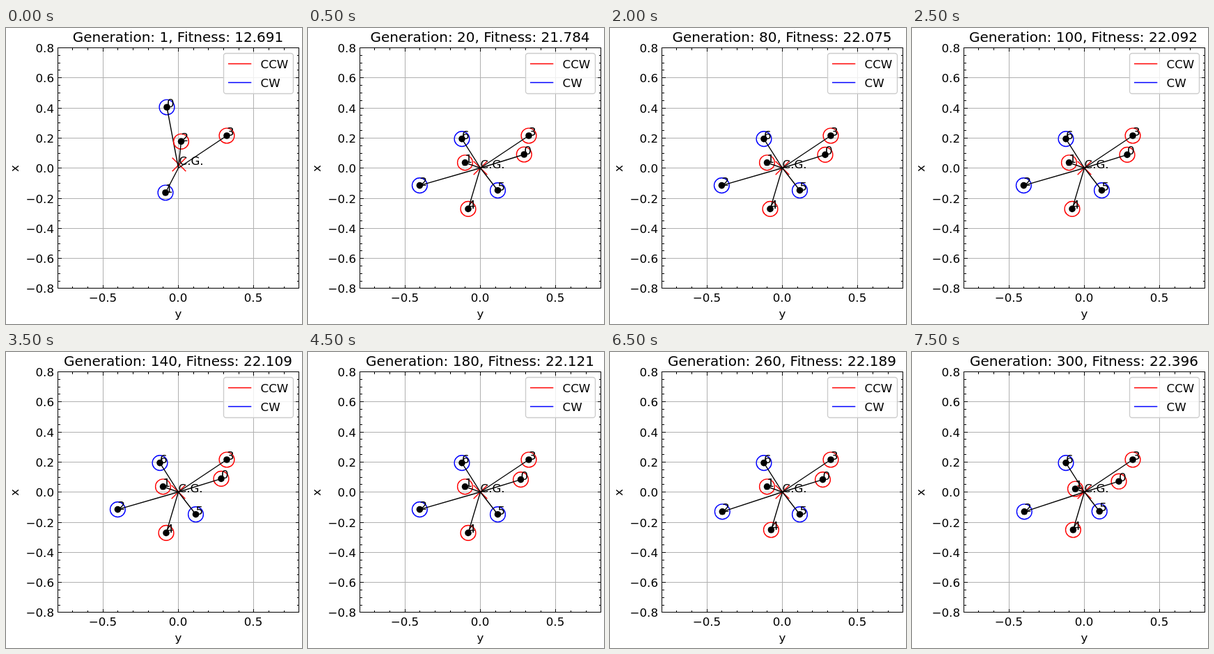
An HTML page that plays this animation: 425x426 px, repeating every 8000 ms.

```html
<!DOCTYPE html>
<html>
<head>
<meta charset="utf-8">
<style>
html, body { margin: 0; width: 100%; height: 100%; overflow: hidden; background: #fff; }
svg { display: block; font: 16.67px "DejaVu Sans", sans-serif; }
.mid { text-anchor: middle; }
.end { text-anchor: end; }
.crisp { shape-rendering: crispEdges; stroke-width: 1; fill: none; }
.line { stroke-width: 1.39; fill: none; }
</style>
</head>
<body>
<svg id="stage" width="425" height="426" viewBox="0 0 425 426"></svg>
<script>
const stage = document.getElementById('stage');
const RED = '#f00', BLUE = '#00f', STEP = 500;
const OX = 247.5, OY = 201.5, UNIT = 216.6;

const snap = v => Math.floor(v) + 0.5;
const px = v => snap(OX + v * UNIT);
const py = v => snap(OY + 0.2 - v * UNIT);
const path = (d, color, cls = 'line') => `<path class="${cls}" d="${d}" stroke="${color}"/>`;
const text = (x, y, s, attrs = '') => `<text x="${x}" y="${y}" ${attrs}>${s}</text>`;
const label = v => v.toFixed(1).replace('-', '\u2212');

function axes() {
  const L = px(-0.8), R = px(0.8), T = py(0.8), B = py(-0.8);
  let grid = '', ticks = '', labels = '';
  for (let i = -16; i <= 16; i++) {
    const y = py(i / 20), major = i % 4 === 0, len = major ? 5 : 3;
    ticks += `M${L} ${y}h${len}M${R} ${y}h${-len}`;
    if (major) {
      grid += `M${L} ${y}H${R}`;
      labels += text(69, y + 6, label(i / 20), 'class="end"');
    }
  }
  for (let i = -8; i <= 8; i++) {
    const x = px(i / 10), major = i % 5 === 0, len = major ? 5 : 3;
    ticks += `M${x} ${B}v${-len}M${x} ${T}v${len}`;
    if (major) {
      grid += `M${x} ${T}V${B}`;
      labels += text(x - 0.5, 394, label(i / 10), 'class="mid"');
    }
  }
  const frame = `M${L} ${T}H${R}V${B}H${L}Z`;
  return {
    back: path(grid, '#b0b0b0', 'crisp'),
    front: path(ticks + frame, '#000', 'crisp') + labels +
      text(247.5, 417, 'y', 'class="mid"') +
      text(0, 0, 'x', 'class="mid" transform="translate(18 202) rotate(-90)"')
  };
}

function legend() {
  const row = (y, color, name) => path(`M319 ${y}h33.3`, color) + text(365.5, y + 6, name);
  return '<rect x="312.5" y="36.5" width="100" height="58" rx="3.5" fill="#fff" fill-opacity=".8" stroke="#ccc" stroke-width="1.39"/>' +
    row(51.5, RED, 'CCW') + row(78.5, BLUE, 'CW');
}

const fitness = ['12.691', '21.784', '21.969', '22.036', '22.075', '22.092', '22.104', '22.109',
  '22.118', '22.121', '22.146', '22.150', '22.178', '22.189', '22.280', '22.396'];

// Each node is [x, y, colour], listed by its index.
function nodesAt(i) {
  if (i === 0) return [[231, 114, BLUE], [229, 237, BLUE], [251.5, 163.3, RED], [317, 155, RED]];
  const first = i < 4 ? [310.3, 182] : i < 8 ? [309, 182.4] : i < 15 ? [305.5, 183.6] : [297, 186.2];
  return [
    [...first, RED],
    i < 15 ? [225.5, 193.8, RED] : [234.5, 197, RED],
    i < 12 ? [160.4, 226.6, BLUE] : [161.3, 229.8, BLUE],
    [317, 155, RED],
    i < 12 ? [230, 260.4, RED] : [231.4, 256, RED],
    i < 14 ? [272.5, 233.7, BLUE] : [269.2, 229.3, BLUE],
    [221, 159.6, BLUE]
  ];
}

function plot(i) {
  const [cx, cy] = i ? [OX, OY] : [248.5, 196.5];
  let shapes = path(`M${cx - 9.8} ${cy - 9.8}l19.6 19.6m0 -19.6l-19.6 19.6`, RED);
  let names = text(cx, cy, 'C.G.');
  nodesAt(i).forEach(([x, y, color], n) => {
    shapes += `<circle class="line" cx="${x}" cy="${y}" r="10.9" stroke="${color}"/>` +
      `<circle cx="${x}" cy="${y}" r="4.8"/>` + path(`M${OX} ${OY}L${x} ${y}`, '#000');
    names += text(x, y, n);
  });
  return shapes + names;
}

function title(i) {
  const nudge = /[02]$/.test(fitness[i]) ? 1 : 0;
  return text(247 - nudge, 20, `Generation: ${20 * i || 1}, Fitness: ${fitness[i]}`,
    'class="mid" font-size="20"');
}

const { back, front } = axes(), key = legend();
let shown = -1;

function draw(now) {
  const i = Math.floor(now / STEP) % fitness.length;
  if (i !== shown) {
    stage.innerHTML = back + plot(i) + front + title(i) + key;
    shown = i;
  }
  requestAnimationFrame(draw);
}
draw(0);
</script>
</body>
</html>
```
